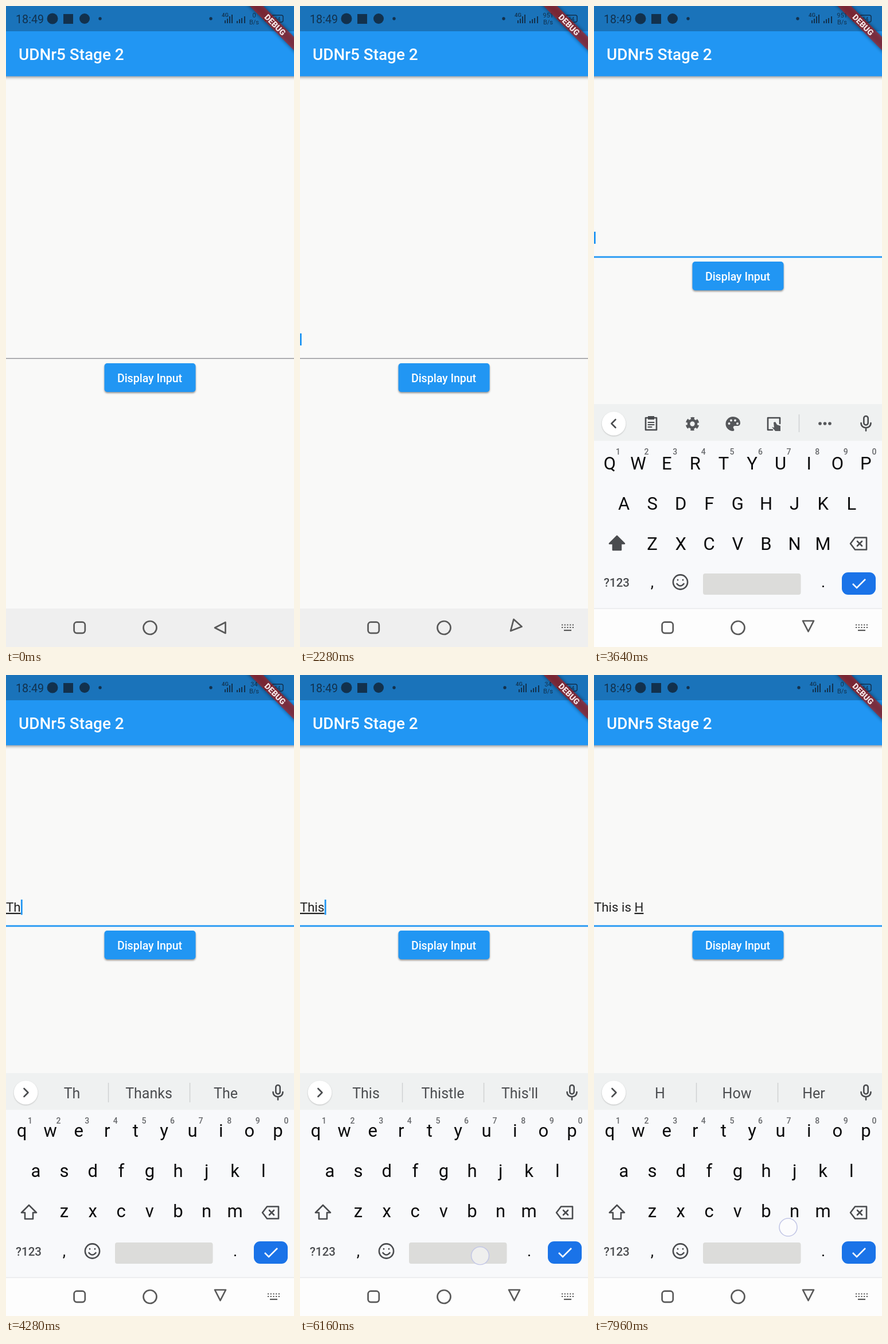
Write an HTML page that moves like this. It is 502 px wide and 1116 px high and loops after 8000 ms.

```html
<!DOCTYPE html>
<html lang="en">
<head>
<meta charset="utf-8">
<title>Text input demo</title>
<style>
  html, body { margin: 0; width: 100%; height: 100%; overflow: hidden; background: #f9f9f8; }
  svg { display: block; width: 100vw; height: 100vh; font-family: Roboto, sans-serif; }
  text { white-space: pre; }
  .mid { text-anchor: middle; }
  .line { fill: none; stroke: #4a4c4f; stroke-width: 2.6; stroke-linecap: round; stroke-linejoin: round; }
  .thin { stroke-width: 2; }
  .key { font-size: 31px; fill: #0b0b0c; text-anchor: middle; }
  .hint { font-size: 14px; font-weight: 500; fill: #66686b; text-anchor: middle; }
  .word { font-size: 25px; fill: #4b4d50; text-anchor: middle; }
  .nav { fill: none; stroke: #595959; stroke-width: 2.7; stroke-linejoin: round; }
  .bar { filter: drop-shadow(0 2.5px 2.6px #0006); }
  .button { filter: drop-shadow(0 2px 1.8px #0006); }
  .disc { filter: drop-shadow(0 1px 1.2px #0003); }
  #pending { text-decoration: underline; text-decoration-thickness: 1.1px; text-underline-offset: 1.8px; }
</style>
</head>
<body>
<svg viewBox="0 0 502 1116">
  <rect width="502" height="1116" fill="#f9f9f8"/>

  <!-- App bar and status bar -->
  <rect class="bar" x="-10" y="40" width="522" height="82.3" fill="#2196f3"/>
  <rect width="502" height="44" fill="#1a73ba"/>
  <text x="22" y="94" font-size="27.9" font-weight="500" fill="#fff">UDNr5 Stage 2</text>
  <g fill="#12314d">
    <text x="17" y="30" font-size="19.7">18:49</text>
    <circle cx="81" cy="22" r="9.5"/>
    <rect x="100" y="14" width="17" height="17"/>
    <circle cx="137" cy="22" r="9"/>
    <circle cx="164" cy="22" r="2.7"/>
    <g id="signal">
      <circle cx="357" cy="22" r="2.7"/>
      <text x="376" y="19" font-size="9.5" font-weight="500">4G</text>
      <path d="M382 30v-5M386 30v-8M390 30v-12M394 30v-15" stroke="#12314d" stroke-width="2"/>
      <path id="bars" stroke="#12314d" stroke-width="2"/>
    </g>
    <text id="speed" class="mid" x="432.5" y="20" font-size="11"></text>
    <text class="mid" x="432.5" y="32" font-size="11">B/s</text>
    <path d="M448 22h9M452 17v10" stroke="#12314d" stroke-width="2"/>
    <rect x="463" y="16" width="20" height="12" rx="3" fill="none" stroke="#12314d" stroke-width="1.5"/>
    <text class="mid" x="473" y="26" font-size="9.5">64</text>
  </g>

  <!-- Form -->
  <g id="form">
    <text id="field" x="0" y="589" font-size="22.3" fill="#212121"><tspan id="done"></tspan><tspan id="pending"></tspan></text>
    <rect id="cursor" width="2.8" fill="#2196f3"/>
    <rect id="rule" width="502"/>
    <rect class="button" x="171.5" y="622" width="159" height="50" rx="5" fill="#2196f3"/>
    <text class="mid" x="250.5" y="654.5" font-size="19.5" font-weight="500" fill="#fff">Display Input</text>
  </g>

  <rect y="1049" width="502" height="67" fill="#efefef"/>

  <!-- Keyboard -->
  <g id="keyboard">
    <rect y="693" width="502" height="423" fill="#f8f9fb"/>
    <rect y="693" width="502" height="64" fill="#eff1f1"/>
    <rect y="1049" width="502" height="67" fill="#fdfdfd"/>
    <rect y="1048.5" width="502" height="1.2" fill="#e6e6e8"/>
    <circle class="disc" cx="34.5" cy="727" r="20.8" fill="#fff"/>
    <path id="chevron" class="line" d="M31.5 720l7 7-7 7"/>
    <g id="tools">
      <path class="line" d="M90 717h19v21H90z"/>
      <path d="M94 714h11v6H94z" fill="#4a4c4f"/>
      <path class="line thin" d="M94.500 725h10M94.500 729h10M94.500 733h6"/>
      <g fill="none" stroke="#55575a">
        <circle cx="171.500" cy="727.500" r="6.500" stroke-width="4.600"/>
        <circle cx="171.500" cy="727.500" r="9.800" stroke-width="4" stroke-dasharray="6 4.263" transform="rotate(12.500 171.500 727.500)"/>
      </g>
      <path d="M242 715a12 12 0 1 0 0 25c4 0 2-4 1-5-1-3 1-4 3-4h4c3 0 5-2 5-5 0-7-6-11-13-11z" fill="#55575a"/>
      <g fill="#eff1f1"><circle cx="235.5" cy="727" r="2"/><circle cx="239" cy="721.5" r="2"/><circle cx="246" cy="721.5" r="2"/><circle cx="250" cy="727" r="2"/></g>
      <path class="line" d="M311 738h-8v-21h21v10"/>
      <path d="M313 725l3-1 3 5 6 2v9h-9l-6-7 4 1z" fill="#55575a"/>
      <path d="M357.5 711v31" stroke="#ced0d1" stroke-width="1.4"/>
      <g fill="#55575a"><circle cx="394" cy="727" r="2.8"/><circle cx="402.5" cy="727" r="2.8"/><circle cx="411" cy="727" r="2.8"/></g>
    </g>
    <g id="words">
      <path d="M178.5 710v34M320.5 710v34" stroke="#ced0d1" stroke-width="1.4"/>
      <text class="word" x="115" y="736.5"></text>
      <text class="word" x="249" y="736.5"></text>
      <text class="word" x="383" y="736.5"></text>
    </g>
    <rect x="470.3" y="714" width="7.4" height="15.5" rx="3.7" class="line"/>
    <path class="line" d="M465.5 726c0 11 17 11 17 0M474 734.5v5"/>
    <g id="keys"></g>
    <path id="shift" class="line" d="M40 923l-13 13h6v11h14v-11h6z"/>
    <path class="line" d="M455 925.5h20v21h-20l-8-10.5zM459 932l8 8M467 932l-8 8"/>
    <text class="mid" x="39.5" y="1011" font-size="20.5" font-weight="500" fill="#4a4c4f">?123</text>
    <text class="key" x="101.5" y="1012" style="font-size:27px">,</text>
    <text class="key" x="399.5" y="1012" style="font-size:27px">.</text>
    <circle class="line" cx="150.5" cy="1003" r="12.6"/>
    <path class="line" d="M144.5 1006q6 7 12 0M146 999v.5M155 999v.5"/>
    <rect x="190" y="988" width="170.5" height="37" rx="4" fill="#dcdcda"/>
    <rect x="432" y="986" width="59" height="39" rx="11" fill="#1a73e8"/>
    <path d="M451 1006l7 7 15-15" fill="none" stroke="#fff" stroke-width="2.6"/>
  </g>

  <!-- Navigation -->
  <rect class="nav" x="118.6" y="1072.7" width="19.2" height="19.2" rx="4.8"/>
  <circle class="nav" cx="251" cy="1082.5" r="11.5"/>
  <path id="back" class="nav" d="M-9.500 0L9 -9.500V9.500z"/>
  <g id="switcher" stroke="#595959" stroke-width="2.2">
    <path d="M456 1077.5h21M456 1082h21" stroke-dasharray="2.2 2.5"/>
    <path d="M460 1087h13"/>
  </g>

  <!-- Debug ribbon -->
  <g transform="translate(502 0) rotate(45)">
    <rect x="-70" y="38" width="140" height="16.7" fill-opacity=".5" style="filter:blur(3px)"/>
    <rect x="-70" y="38" width="140" height="16.7" fill="#b71c1c" fill-opacity=".63"/>
    <text class="mid" y="51.5" font-size="14.2" font-weight="900" fill="#f5e4e6">DEBUG</text>
  </g>
  <circle id="touch" r="15.5" fill="#fff" fill-opacity=".55" stroke="#c3c7e6" stroke-width="1.6"/>
</svg>
<script>
const LOOP = 8000;
const $ = id => document.getElementById(id);
const set = (el, attrs) => { for (const k in attrs) el.setAttribute(k, attrs[k]); };
const clamp = v => Math.max(0, Math.min(1, v));
const progress = (t, from, to) => clamp((t - from) / (to - from));
const easeOut = p => 1 - (1 - p) ** 3;
const show = (el, on) => { el.style.display = on ? '' : 'none'; };

// Latest entry whose start time has passed
const at = (track, t) => track.reduce((found, step) => step[0] <= t ? step : found);

const typing = [
  [0, '', ''], [3840, '', 'T'], [4160, '', 'Th'], [5160, '', 'Thi'], [5720, '', 'This'],
  [6240, 'This ', ''], [6520, 'This ', 'i'], [6840, 'This ', 'is'],
  [7000, 'This is ', ''], [7400, 'This is ', 'H']
];
const suggestions = [
  [0], [3920, 'T', 'The', 'This'], [4240, 'Th', 'Thanks', 'The'], [5280, 'This', 'Thistle', "This'll"],
  [6320, 'is', 'is the', 'one'], [6720, 'I', 'is', 'in'],
  [6920, 'is', 'is the', 'is a'], [7040, 'Really', 'The', 'A'], [7600, 'H', 'How', 'Her']
];
const speeds = [[0, '0'], [1200, '951'], [4240, '34'], [6800, '0']];
const cursorTrack = [
  [0, 0], [2200, 1], [3200, 0], [3480, 1], [4600, 0], [4920, 1], [7080, 0], [7400, 1], [7800, 0]
];
const shiftTrack = [[0, 0], [3560, 1], [3840, 0], [7080, 1], [7400, 0]];
const touches = [
  [1040, 1320, 357, 603], [3440, 3560, 40, 936], [3720, 3840, 226, 795], [4000, 4160, 299, 864],
  [4920, 5160, 374, 795], [5560, 5720, 102, 864], [6120, 6280, 314, 1011], [6520, 6720, 374, 795],
  [6760, 6840, 102, 864], [6900, 6990, 314, 1011], [7030, 7060, 40, 936],
  [7240, 7380, 299, 864], [7920, 8100, 338.5, 961.5]
];

const svgText = (cls, x, y, content) => {
  const el = document.createElementNS('http://www.w3.org/2000/svg', 'text');
  set(el, { class: cls, x, y });
  el.textContent = content;
  $('keys').append(el);
  return el;
};
const PITCH = 49.6;
const letters = [];
[['qwertyuiop', 27.5, 804], ['asdfghjkl', 52, 874], ['zxcvbnm', 101.5, 944]].forEach(([row, x, y]) =>
  [...row].forEach((char, i) => letters.push({ char, y, el: svgText('key', x + i * PITCH, y, char) })));
[...'1234567890'].forEach((digit, i) => svgText('hint', 42 + i * PITCH, 781, digit));

const words = $('words').querySelectorAll('text');

function drawField(t) {
  const raised = t >= 3000;
  const [, done, pending] = at(typing, t);
  const empty = !(done + pending);
  $('done').textContent = done;
  $('pending').textContent = pending;
  set($('form'), { transform: `translate(0 ${raised ? -177 : 0})` });
  set($('rule'), raised
    ? { y: 612.6, height: 2.8, fill: '#2196f3' }
    : { y: 612.9, height: 1.4, fill: '#8e8e94' });
  set($('cursor'), {
    x: empty ? 0 : $('field').getComputedTextLength() + 0.3,
    y: empty ? 570 : 568,
    height: empty ? 21 : 26.5
  });
  show($('cursor'), at(cursorTrack, t)[1]);
}

function drawKeyboard(t) {
  const slide = 423 * (1 - easeOut(progress(t, 2300, 2640)));
  show($('keyboard'), t >= 2300);
  set($('keyboard'), { transform: `translate(0 ${slide})` });

  const upper = at(shiftTrack, t)[1];
  for (const { char, y, el } of letters) {
    el.textContent = upper ? char.toUpperCase() : char;
    el.setAttribute('y', upper ? y + 3 : y);
  }
  $('shift').style.fill = upper ? '#4a4c4f' : 'none';

  const [, ...choices] = at(suggestions, t);
  const predicting = choices.length > 0;
  show($('tools'), !predicting);
  show($('words'), predicting);
  words.forEach((el, i) => { el.textContent = choices[i] || ''; });
  set($('chevron'), { transform: predicting ? '' : 'translate(69 0) scale(-1 1)' });
}

function drawSystem(t) {
  const speed = at(speeds, t)[1];
  $('speed').textContent = speed;
  set($('signal'), { transform: `translate(${speed === '951' ? -2 : 0} 0)` });
  const top = t >= 6800 ? 15 : 12;
  set($('bars'), { d: `M403 30v-4M407 30v-7M411 30v-${top - 3}M416 30v-${top}` });

  const turn = progress(t, 2190, 2360);
  set($('back'), { transform: `translate(373.5 ${1082.5 - 3 * turn}) rotate(${-90 * turn})` });
  show($('switcher'), t >= 2240);
}

function drawTouch(t) {
  const touch = touches.find(([from, to]) => t >= from && t < to + 80);
  show($('touch'), touch);
  if (!touch) return;
  const [from, to, cx, cy] = touch;
  const opacity = Math.min(1, 0.6 + progress(t, from, from + 40)) * (1 - progress(t, to, to + 80));
  set($('touch'), { cx, cy, opacity });
}

function frame(now) {
  const t = now % LOOP;
  drawField(t);
  drawKeyboard(t);
  drawSystem(t);
  drawTouch(t);
  requestAnimationFrame(frame);
}
frame(0);
</script>
</body>
</html>
```
